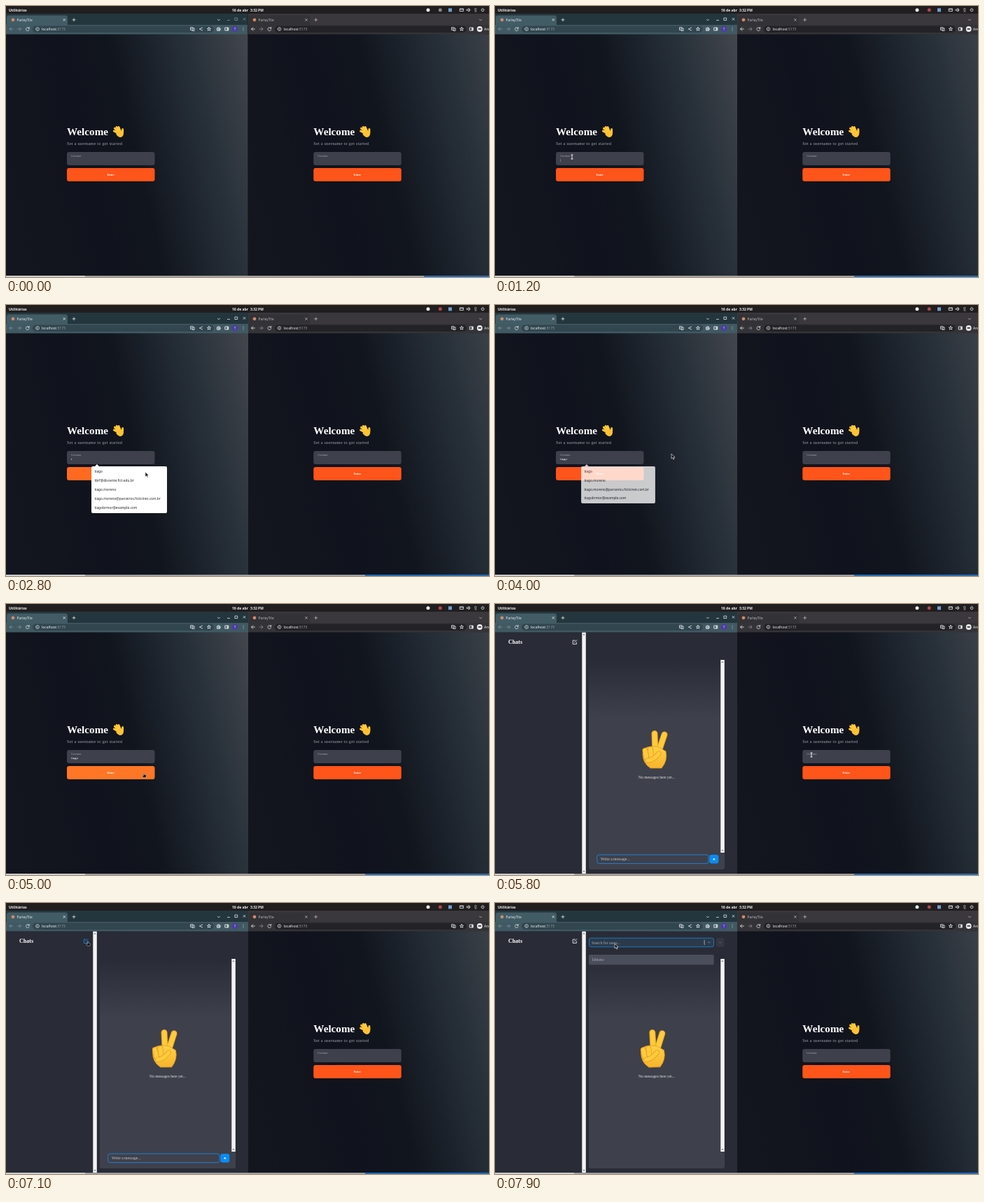
An HTML page that plays this animation: 690x388 px, repeating every 8 s.

```html
<!DOCTYPE html>
<html lang="pt-BR">
<head>
<meta charset="utf-8">
<title>Chat demo</title>
<style>
html, body { margin: 0; width: 100%; height: 100%; overflow: hidden; background: #12151e; }
svg { display: block; width: 100%; height: 100%; font-family: 'Noto Sans', 'Open Sans', sans-serif; }
.serif { font-family: 'Liberation Serif', 'Noto Serif', serif; }
.bold { font-weight: bold; }
.mid { text-anchor: middle; }
.line { fill: none; stroke: currentColor; stroke-width: .8; stroke-linecap: round; stroke-linejoin: round; }
</style>
</head>
<body>
<svg id="stage" viewBox="0 0 690 388"></svg>
<script>
const LOOP = 8000;
const FOCUS = 1000, POPUP = 2000, FADE = 3945, ENTER = 5200, SEARCH = 7300, OPTIONS = 7700;
const USER = 'tiago', KEY_TIMES = [2100, 2900, 3000, 3100, 3300];
const ENTRIES = ['tiago', 'tbrf@discente.fict.edu.br', 'tiago.moreno',
  'tiago.moreno@parceiros.ficticinet.com.br', 'tiagobrmor@example.com', 'exemplo'];

// Pointer path: time, x, y
const PATH = [
  [100, 640, 160], [500, 500, 215], [900, 110, 216], [1400, 110, 216], [1800, 199, 239],
  [3500, 199, 239], [3900, 252, 213], [4050, 252, 213], [4300, 175, 241], [4850, 175, 241],
  [5000, 197, 242], [5300, 197, 242], [5750, 452, 216], [5900, 452, 216], [6600, 117, 55],
  [7500, 117, 55], [7800, 171, 58], [8000, 171, 58]];

const ICONS = {
  back: 'M2.4 0H-2.4M-.2-2.2L-2.4 0-.2 2.2',
  forward: 'M-2.4 0H2.4M.2-2.2L2.4 0 .2 2.2',
  reload: 'M2-1.2A2.4 2.4 0 1 0 2.3 .8M2.3-2.6V-.9H.6',
  info: 'M-2.4 0a2.4 2.4 0 1 0 4.8 0a2.4 2.4 0 1 0-4.8 0M0-.2V1.2M0-1.3V-1.2',
  translate: 'M-2.6-2.4H.6V1.4H-2.6ZM-.4 2.5H2.6V-1.2H1.4M-1.8-.6H-.2',
  share: 'M1.8-1.8L-1.6 0 1.8 1.8M1.8-1.9V-1.7M-1.6-.1V.1M1.8 1.7V1.9',
  star: 'M0-2.6L.7-.8 2.6-.8 1.1.4 1.7 2.3 0 1.2-1.7 2.3-1.1.4-2.6-.8-.7-.8Z',
  puzzle: 'M-2-1.4H-.6V-2.2H.6V-1.4H1.6V-.2H2.3V.9H1.6V2.2H-2ZM-1 0H.8M-1 1H.8',
  panel: 'M-2.3-2H2.3V2H-2.3ZM.6-1.6V1.6M1.4-1.6V1.6',
  dots: 'M0-2V-1.9M0 0V.1M0 2V2.1',
  cross: 'M-1.4-1.4L1.4 1.4M1.4-1.4L-1.4 1.4',
  plus: 'M-2 0H2M0-2V2',
  chevron: 'M-1.6-.8L0 .8 1.6-.8',
  minimise: 'M-1.6 1.4H1.6',
  maximise: 'M-1.7-1.7H1.7V1.7H-1.7Z',
  edit: 'M.4-2.4H-2.8V2.9H2.4V.4M3-2.9L-.6.7',
  mail: 'M-2.4-1.8H2.4V1.8H-2.4ZM-2.4-.9H2.4',
  sound: 'M-2.4-.8H-1.2L.4-2.2V2.2L-1.2.8H-2.4ZM1.6-1.2Q2.6 0 1.6 1.2',
  mic: 'M-.9-2.2H.9V.4H-.9ZM0 1V2.2M-1.2 2.3H1.2',
  power: 'M-1.4-1.4A2 2 0 1 0 1.4-1.4M0-2.5V-.4'
};

const text = (x, y, size, str, fill, cls = '', extra = '') =>
  `<text x="${x}" y="${y}" font-size="${size}" fill="${fill}" class="${cls}" ${extra}>${str}</text>`;
const rect = (x, y, w, h, fill, r = 0, extra = '') =>
  `<rect x="${x}" y="${y}" width="${w}" height="${h}" rx="${r}" fill="${fill}" ${extra}/>`;
const dot = (x, y, r, fill, extra = '') => `<circle cx="${x}" cy="${y}" r="${r}" fill="${fill}" ${extra}/>`;
const icon = (name, x, y, color = '#e4e8ea', extra = '') =>
  `<path class="line" d="${ICONS[name]}" transform="translate(${x} ${y})" color="${color}" ${extra}/>`;
const group = (id, content, extra = '') => `<g id="${id}" ${extra}>${content}</g>`;

// Skin-coloured strokes with a darker rim
const fingers = (d, w) => ['#e39a22', '#ffcb3c'].map((c, i) =>
  `<path d="${d}" fill="none" stroke="${c}" stroke-width="${w - i * w * .2}" stroke-linecap="round" stroke-linejoin="round"/>`).join('');

const wavingHand = `<g transform="translate(65 171)">
  ${fingers('M10 12L2.4 8M10 11L3.4 4.2M11 10L6 2.4M12 10L9 2.6', 3)}
  ${fingers('M13.5 12Q15.4 9 14.6 5.6', 3)}
  <path d="M6 9L12 7 16 9Q16.6 15 12.6 16.8 9 17.6 5.4 13Z" fill="#ffc233"/></g>`;

const victoryHand = `
  ${fingers('M229 214L228 185.5M233 214L242 187', 9)}
  <path d="M213 207Q222 202 234 205L244 211Q247 224 238 235H222Q211 228 211 214Z" fill="url(#skin)" stroke="#e39a22" stroke-width=".8"/>
  ${fingers('M214.5 210L216.5 220', 8)}${fingers('M222 208L223 217', 8)}
  ${fingers('M218 224Q226 224 234 214', 7)}`;

const chrome = c => `
  ${rect(c.x, 11, c.w, 17, c.strip)}${rect(c.x, 27, c.w, 13.5, c.bar)}
  <path d="M${c.x + 1} 28V17Q${c.x + 1} 13.5 ${c.x + 4} 13.5H${c.x + 85}Q${c.x + 88} 13.5 ${c.x + 88} 17V28Z" fill="${c.tab}"/>
  ${rect(c.pill, 28.5, c.pillW, 9.5, c.field, 4.7)}
  ${dot(c.icon, 19.8, 2.4, '#cf8a6c')}
  ${text(c.icon + 5.5, 21.7, 4.9, 'ParleyTile', c.ink)}
  ${icon('cross', c.cross, 19.8, c.ink)}${icon('plus', c.cross + 13.7, 19.8, c.ink)}
  ${icon('back', c.nav, 33, c.backInk)}${icon('forward', c.nav + 11.6, 33, '#87939a')}
  ${icon('reload', c.nav + 23.4, 33)}${icon('info', c.nav + 37.5, 33, '#c8cfd3')}
  <text x="${c.nav + 43.5}" y="34.9" font-size="5" fill="#f1f3f4">localhost<tspan fill="#97a1a7">:5173</tspan></text>`;

const form = (id, x) => `<g transform="translate(${x})">
  ${text(0, 185, 15.2, 'Welcome', '#fff', 'serif bold')}${wavingHand}
  ${text(0, 199, 6.4, 'Set a username to get started', '#a0a2a9', 'serif', 'letter-spacing=".2"')}
  ${rect(0, 209, 125.5, 19, '#3e404b', 3)}
  ${text(6, 215.6, 3.6, 'Username', '#a2a4ad', 'serif')}
  ${text(6, 222.3, 5, '', '#fff', 'serif', `id="${id}Name"`)}
  ${rect(0, 232, 125.5, 19, '#ff541a', 3, `id="${id}Button"`)}
  ${text(62.7, 243, 4.3, 'Enter', '#fff', 'serif bold mid')}</g>`;

const scrollbar = (x, y, h) => `${rect(x, y, 5.5, h, '#f3f3f4')}
  <path d="M${x + 1.2} ${y + 4}h3l-1.5-2zM${x + 1.2} ${y + h - 4}h3l-1.5 2z" fill="#777"/>`;

const chat = `
  ${rect(0, 40.5, 346, 346, '#292b36')}
  ${rect(134, 80, 194, 300, 'url(#feed)', 3)}
  ${text(19, 57, 8, 'Chats', '#fff', 'serif bold')}
  ${icon('edit', 114, 54.5, '#fff', 'id="edit"')}
  ${scrollbar(124.3, 40.5, 345.5)}${scrollbar(322.3, 80, 276)}
  ${group('victory', victoryHand)}
  ${text(231, 250, 5.5, 'No messages here yet...', '#e3e3e7', 'serif mid')}
  ${group('compose',
    rect(145.7, 359, 159.3, 12.6, '#3e404b', 3, 'stroke="#1c86e2" stroke-width=".9"') +
    text(151, 367, 5.7, 'Write a message...', '#c6c7cd', 'serif') +
    rect(306.3, 359, 13, 12.6, '#0a8cf4', 3) +
    '<path d="M311 366.2L312.8 363.8 314.6 366.2Z" fill="#fff"/>')}
  ${group('search',
    rect(134.5, 50.2, 178, 12.6, '#2b3a4a', 2.5, 'stroke="#1a7fce" stroke-width=".9"') +
    text(138, 58.5, 5.7, 'Search for users...', '#a7acb6', 'serif') +
    rect(298.7, 53, .8, 7, '#b9bcc4') + icon('chevron', 306, 56.5, '#8b8f99') +
    rect(316, 50, 11.5, 13, '#343641', 2.5) + icon('cross', 321.7, 56.5, '#555865'))}
  ${group('options', rect(134, 74, 178.7, 14.5, '#4a4d5a', 1.5) + text(138.5, 83.2, 5.7, 'fabiano', '#a9acb8', 'serif'))}`;

const popup = `<path d="M126.5 231.5L130 228 133.5 231.5Z" fill="#fff"/>
  ${rect(122, 231, 108, 67, '#fff', 2, 'id="popupBox"')}
  ${ENTRIES.map((s, i) => text(126.4, 0, 4.85, s, '#25272b', 'entry')).join('')}`;

const stage = document.getElementById('stage');
stage.innerHTML = `<defs>
  <linearGradient id="night" gradientUnits="userSpaceOnUse" x1="-29" y1="260" x2="375" y2="166">
    <stop stop-color="#14161f"/><stop offset=".35" stop-color="#10131d"/><stop offset=".53" stop-color="#11151e"/>
    <stop offset=".8" stop-color="#28313a"/><stop offset="1" stop-color="#43464d"/></linearGradient>
  <linearGradient id="feed" x2="0" y2="1"><stop stop-color="#292b36"/><stop offset=".28" stop-color="#3e404b"/></linearGradient>
  <linearGradient id="skin" x2="0" y2="1"><stop stop-color="#ffd145"/><stop offset="1" stop-color="#f7b42c"/></linearGradient>
  </defs>
  ${rect(0, 0, 346, 388, 'url(#night)')}
  <g transform="translate(346) scale(1.07 1)">${rect(0, 0, 346, 388, 'url(#night)')}</g>
  ${group('login', form('left', 87))}${form('right', 439.3)}
  ${group('chat', chat)}
  ${chrome({ x: 0, w: 346, strip: '#24363d', tab: '#425c66', bar: '#405963', field: '#31464f', pill: 38, pillW: 259,
    icon: 10, cross: 83.3, nav: 7.5, ink: '#e6ecee', backInk: '#87939a' })}
  ${group('controls', icon('minimise', 318, 19) + icon('maximise', 329, 18.8) + icon('cross', 340.5, 18.8))}
  ${icon('chevron', 304, 20)}${icon('translate', 266.5, 33)}${icon('share', 278.3, 33)}${icon('star', 290, 33)}
  ${icon('puzzle', 304, 33, '#fff')}${icon('panel', 315.5, 33, '#fff')}
  ${dot(327, 33, 4, '#4b3aa8')}${text(327, 34.7, 4.6, 'T', '#e6e0ff', 'mid')}${icon('dots', 339, 33)}
  ${chrome({ x: 346, w: 344, strip: '#3a383c', tab: '#333236', bar: '#343337', field: '#232226', pill: 384, pillW: 274,
    icon: 355, cross: 429, nav: 353, ink: '#b9b8bb', backInk: '#eee' })}
  ${icon('chevron', 678, 20, '#b9b8bb')}${icon('translate', 639.5, 33)}${icon('star', 651, 33)}
  ${icon('panel', 665, 33, '#fff')}${dot(676.7, 33, 3.9, '#f2f2f2')}${rect(674.4, 32, 4.6, 1.8, '#343337', .8)}
  ${text(683, 34.8, 4.9, 'Anônima', '#eee')}
  ${rect(345, 11, 1, 375, '#232226', 0, 'id="seam"')}
  ${rect(0, 0, 690, 11, '#211e20')}
  ${text(4, 7.6, 5.1, 'Utilitários', '#f2f2f2', 'bold')}
  ${text(323, 7.6, 5, '16 de abr', '#f2f2f2', 'bold')}${text(349, 7.6, 4.9, '3:32 PM', '#f2f2f2', 'bold')}
  ${dot(603, 5.7, 2.5, '#e8e8e8')}${dot(620.3, 5.7, 2.5, '#8a8688', 'id="recorder"')}${rect(632, 3.3, 5, 5, '#6f9fd0')}
  ${icon('mail', 651, 5.7)}${icon('sound', 661, 5.7)}${icon('mic', 671, 5.7, '#99969a')}${icon('power', 681, 5.7)}
  ${rect(0, 386.2, 690, 1.8, '#a5a7aa')}${rect(0, 386.2, 113, 1.8, '#cfd0d2')}
  ${rect(597, 386.2, 177, 1.8, '#1468bd', 0, 'id="taskbar"')}
  ${group('popup', popup)}
  ${group('pointer', `
    <path id="arrow" d="M0 0V7L1.7 5.5 2.8 8 4 7.5 2.9 5.1H5Z" fill="#111" stroke="#fff" stroke-width=".6"/>
    <path id="hand" d="M-.6 0Q0-.7.6 0V2.2L3 2.8Q3.6 3 3.4 4L2.8 6.4H-.8L-2.4 3.8Q-2 3-.6 4Z" fill="#111" stroke="#ddd" stroke-width=".45"/>
    <path id="beam" d="M-1.5-3H1.5M0-3V3M-1.5 3H1.5" fill="none" stroke="#fff" stroke-width=".9"/>`)}`;

const $ = id => document.getElementById(id);
const show = (id, on) => { $(id).style.display = on ? '' : 'none'; };
const inside = (p, x, y, w, h) => p.x >= x && p.x <= x + w && p.y >= y && p.y <= y + h;
const entries = [...document.querySelectorAll('.entry')];

function pointerAt(t) {
  const i = Math.max(1, PATH.findIndex(k => k[0] > t));
  const [t0, x0, y0] = PATH[i - 1], [t1, x1, y1] = PATH[i];
  const u = Math.min(1, Math.max(0, (t - t0) / (t1 - t0))), e = u * u * (3 - 2 * u);
  return { x: x0 + (x1 - x0) * e, y: y0 + (y1 - y0) * e };
}

function drawPopup(t, typed) {
  const alpha = t < POPUP ? 0 : Math.max(0, Math.min(1, 1 - (t - FADE) / 250));
  show('popup', alpha > 0);
  $('popup').setAttribute('opacity', alpha);
  $('popup').setAttribute('transform', `translate(176 231) scale(${1 - .09 * (1 - alpha)}) translate(-176 -231)`);
  let rows = 0;
  entries.forEach((el, i) => {
    const on = ENTRIES[i].startsWith(USER.slice(0, typed));
    el.style.display = on ? '' : 'none';
    if (on) el.setAttribute('y', 240.3 + 13 * rows++);
  });
  $('popupBox').setAttribute('height', 2 + 13 * rows);
  return alpha > 0;
}

function draw(t) {
  const focused = t >= FOCUS, inChat = t >= ENTER;
  show('login', !inChat);
  show('chat', inChat);
  show('compose', t < SEARCH);
  show('search', t >= SEARCH);
  show('options', t >= OPTIONS);
  show('seam', !focused);
  $('controls').setAttribute('opacity', focused ? 1 : .5);
  $('recorder').setAttribute('fill', focused ? '#b0474a' : '#8a8688');
  $('taskbar').setAttribute('x', focused ? 513 : 597);

  const typed = KEY_TIMES.filter(k => k <= t).length;
  const caret = focused && t < FADE && Math.floor((t - FOCUS) / 500) % 2 === 0;
  $('leftName').textContent = USER.slice(0, typed) + (caret ? '|' : '');
  const popupOpen = drawPopup(t, typed);

  const p = pointerAt(t);
  const overLeft = !inChat && inside(p, 87, 232, 125.5, 19), overRight = inside(p, 439, 232, 125.5, 19);
  const overEdit = inChat && inside(p, 110, 50, 9, 9);
  const overField = inside(p, 439, 209, 125.5, 19) || !inChat && inside(p, 87, 209, 125.5, 19);
  const kind = popupOpen ? 'arrow' : overLeft || overRight || overEdit ? 'hand' : overField ? 'beam' : 'arrow';
  for (const id of ['arrow', 'hand', 'beam']) show(id, id === kind);
  show('pointer', t >= PATH[0][0]);
  $('pointer').setAttribute('transform', `translate(${p.x} ${p.y})`);
  $('leftButton').setAttribute('fill', overLeft ? popupOpen ? '#ff6a20' : '#ff7626' : '#ff541a');
  $('rightButton').setAttribute('fill', overRight ? '#ff7626' : '#ff541a');
  $('edit').setAttribute('color', overEdit ? '#1c90f0' : '#fff');

  const drift = Math.max(0, t - 5800) / 1000;
  $('victory').setAttribute('transform', `translate(${-drift}) rotate(${-drift * .6} 229 235)`);
}

function tick() {
  draw(performance.now() % LOOP);
  requestAnimationFrame(tick);
}
tick();
</script>
</body>
</html>
```
